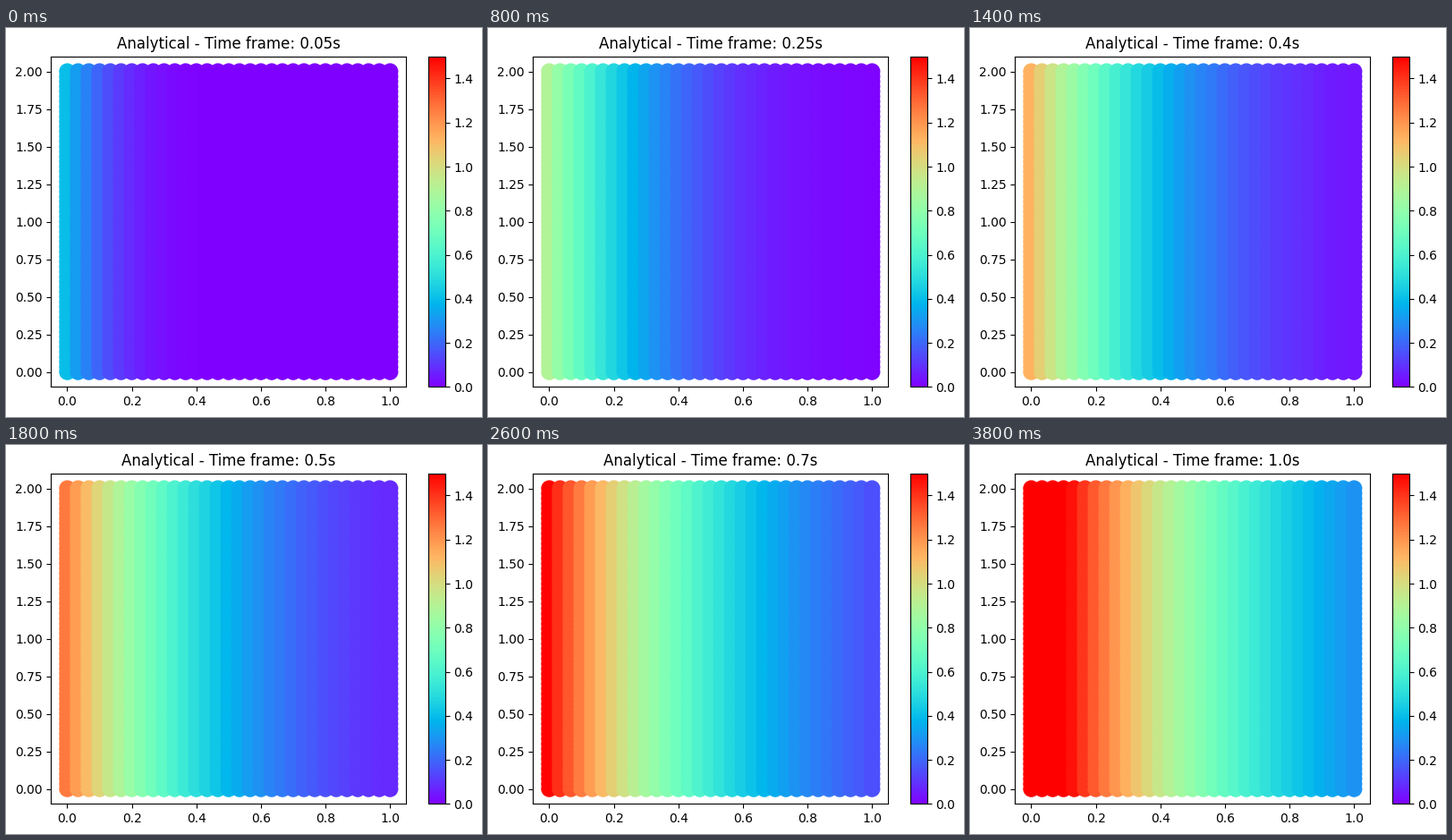
Write a matplotlib script that moves like this. It is 532 by 435 pixels and loops after 4000 ms.

```python
import math

import matplotlib.pyplot as plt
import numpy as np
from matplotlib.animation import FuncAnimation

W, H, DPI = 532, 435, 100
FRAMES, STEP_MS, DT = 20, 200, 0.05
ALPHA, FLUX = 0.4, 2.5  # diffusivity, surface flux over conductivity
NX, NY = 31, 61

erfc = np.vectorize(math.erfc)


def temperature(x, t):
    """Semi-infinite solid heated by a constant flux at x = 0."""
    depth = 2 * np.sqrt(ALPHA * t)
    eta = x / depth
    return FLUX * (depth / np.sqrt(np.pi) * np.exp(-eta**2) - x * erfc(eta))


def add_axes(left, top, width, height):
    return fig.add_axes([left / W, 1 - (top + height) / H, width / W, height / H])


plt.rcParams["font.family"] = "DejaVu Sans"
# The small margin keeps the pixel size from being truncated downwards.
fig = plt.figure(figsize=((W + 0.01) / DPI, (H + 0.01) / DPI), dpi=DPI,
                 facecolor="white")
ax = add_axes(50.45, 31.8, 396.8, 369.6)
cax = add_axes(472.05, 31.8, 18.48, 369.6)

xs = np.linspace(0, 1, NX)
x, y = np.meshgrid(xs, np.linspace(0, 2, NY), indexing="ij")
dots = ax.scatter(x.ravel(), y.ravel(), s=150, c=np.zeros(x.size),
                  cmap="rainbow", vmin=0, vmax=1.5)
ax.set_xlim(-0.05, 1.05)
ax.set_ylim(-0.1, 2.1)
fig.colorbar(dots, cax=cax)
title = ax.set_title("")


def update(i):
    t = round((i + 1) * DT, 2)
    dots.set_array(np.repeat(temperature(xs, t), NY))
    title.set_text(f"Analytical - Time frame: {t}s")
    return dots, title


anim = FuncAnimation(fig, update, frames=FRAMES, interval=STEP_MS,
                     repeat=True, repeat_delay=0)
plt.show()
```
